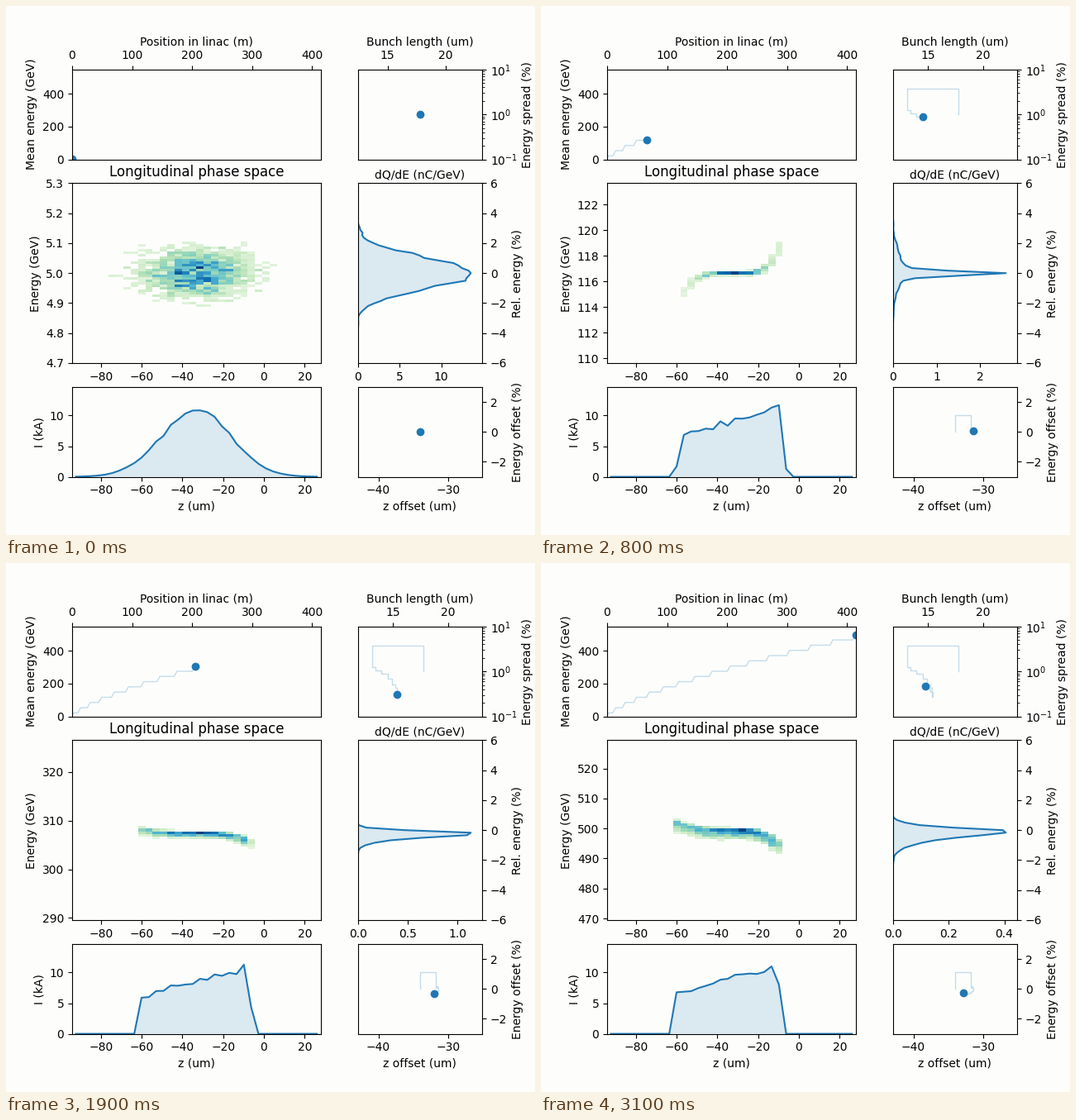
A matplotlib script that plays this animation: 640 px wide and 640 px high, repeating every 3200 ms.

```python
import numpy as np
import matplotlib.pyplot as plt
from matplotlib.animation import FuncAnimation

FRAMES, INTERVAL = 32, 100
BLUE, PAPER = "#1f77b4", "#fdfefc"
NZ, NE = 34, 71
Z_LO, Z_HI = -94.15, 27.85
TOTAL_KA = 130            # sum of the current over all z bins
CHARGE = 1.555            # nC
COUNTS_PER_KA = 32

cols = np.arange(NZ)
z_mid = Z_LO + (cols + 0.5) * (Z_HI - Z_LO) / NZ
bin_e = 12 / NE           # percent
rel = (np.arange(NE) - NE // 2) * bin_e

# The bunch alternates between a cell that changes its energy (odd frames)
# and a drift that changes its shape along z (even frames).
frames = np.arange(FRAMES)
cell = (frames + 1) // 2
drift = frames // 2

energy = np.where(cell == 0, 5.0, 20.95 + 31.9 * (cell - 1))
stride = np.where(frames % 2, 4.8, 1.53 * np.sqrt(energy))
stride[:2] = 0, 2.4
position = np.cumsum(stride)

length = np.interp(drift, [0, 1, 2, 4, 6, 8, 10, 15],
                   [17.78, 13.13, 13.4, 14.55, 15.25, 15.42, 15.37, 14.78])
z_off = np.interp(drift, [0, 1, 4, 6, 9, 13, 15],
                  [-34.05, -31.75, -31.4, -31.5, -32, -32.6, -32.85])
spread = np.interp(cell, [0, 1, 2, 3, 4, 6, 9, 13, 16],
                   [1, 3.7, 1.25, 1.05, 0.87, 0.51, 0.275, 0.415, 0.46])
e_off = np.interp(cell, [0, 1, 2, 3, 4, 6, 10, 13, 16],
                  [0, 1.13, 0.08, 0.2, 0.08, -0.08, -0.3, -0.3, -0.25])


def current(j):
    """A bell before compression, afterwards a ramp with fading horns."""
    if j == 0:
        amps = np.exp(-0.5 * ((z_mid + 33.5) / 17) ** 2)
    else:
        tail = np.interp(j, [1, 4, 6], [10.5, 9.25, 8.5])
        head = np.interp(j, [1, 4, 6, 9, 15], [21.8, 23.6, 23.9, 23.9, 23.2])
        u = np.clip((cols - tail) / (head - tail), 0, 1)
        horns = 8 * np.exp(-u / 0.08) + 14 * np.exp((u - 1) / 0.07)
        cover = np.clip(cols + 0.5 - tail, 0, 1) * np.clip(head - cols + 0.5, 0, 1)
        amps = cover * (6 + 5 * u + horns * 3.0 ** (1 - j))
    amps *= np.random.default_rng(j).normal(1, 0.03, NZ)
    return amps * TOTAL_KA / amps.sum()


def chirp(n):
    """Mean energy per column and its spread up and down, in percent."""
    k = cell[n]
    if k == 0:
        return np.zeros(NZ), 1, 1
    if k == 1:
        x = z_mid + 34
        if drift[n] == 0:
            return 1.1 + 0.11 * x - 2.4e-4 * x ** 3, 0.24, 0.24
        width = 0.2 + 0.07 * np.abs(x)
        return 1.1 + 0.09 * x, width, width
    x = (cols - 16.5) / 6.5
    lift = np.interp(k, [4, 6, 10, 13, 16], [1.6, 0.75, -0.4, -0.86, -0.92])
    power = np.interp(k, [4, 6, 10], [4.3, 2.5, 3])
    side = np.where(x > 0, 1, 0.87 if lift > 0 else 0.33)
    base = np.interp(k, [2, 4, 6, 10, 13, 16], [0.03, -0.02, -0.17, -0.17, -0.03, 0.02])
    centre = base + lift * side * np.sign(x) * np.abs(x) ** power
    extra = 0.35 * np.abs(np.gradient(centre))
    down = np.interp(k, [2, 6, 10, 13, 16], [0.07, 0.08, 0.2, 0.25, 0.33])
    return centre, 0.07 + extra, down + extra


def phase_space(n, amps):
    centre, up, down = chirp(n)
    d = rel[:, None] - centre
    shape = np.exp(-0.5 * (d / np.where(d > 0, up, down)) ** 2)
    area = 1.25 * (up + down) / bin_e
    shape /= np.maximum(shape.sum(axis=0), 0.5 * area)
    return np.random.default_rng(n + 3).poisson(shape * amps * COUNTS_PER_KA)


def spectrum(n, counts):
    density = np.convolve(counts.sum(axis=1), [0.2, 0.6, 0.2], "same")
    share = np.interp(cell[n], [0, 1, 2, 10, 13, 16], [.0736, .05, .31, .38, .235, .22])
    peak = share * CHARGE / (bin_e / 100 * energy[n])
    return peak * density / density.max()


fig, axes = plt.subplots(
    3, 2, figsize=(6.4, 6.4), dpi=100, facecolor=PAPER,
    gridspec_kw=dict(width_ratios=[2, 1], height_ratios=[1, 2, 1],
                     left=.125, right=.9, bottom=.11, top=.88, wspace=.2, hspace=.2))
(ax_e, ax_s), (ax_ps, ax_q), (ax_i, ax_o) = axes
for ax in axes.flat:
    ax.set_facecolor(PAPER)
for ax in (ax_e, ax_s):
    ax.xaxis.tick_top()
for ax in (ax_e, ax_s, ax_q):
    ax.xaxis.set_label_position("top")
for ax in (ax_s, ax_q, ax_o):
    ax.yaxis.tick_right()
    ax.yaxis.set_label_position("right")

ax_e.set(xlabel="Position in linac (m)", ylabel="Mean energy (GeV)",
         xlim=(0, position[-1]), ylim=(0, 550))
ax_s.set(xlabel="Bunch length (um)", ylabel="Energy spread (%)",
         yscale="log", ylim=(0.1, 10))
ax_ps.set(title="Longitudinal phase space", ylabel="Energy (GeV)", xlim=(Z_LO, Z_HI))
ax_q.set(xlabel="dQ/dE (nC/GeV)", ylabel="Rel. energy (%)", ylim=(-6, 6))
ax_i.set(xlabel="z (um)", ylabel="I (kA)", xlim=(Z_LO, Z_HI), ylim=(0, 14.66))
ax_o.set(xlabel="z offset (um)", ylabel="Energy offset (%)",
         xlim=(z_off[0] - length[0] / 2, z_off[0] + length[0] / 2), ylim=(-3, 3))


def tracker(ax, x, y):
    trail, = ax.plot([], [], color=BLUE, alpha=0.25, lw=1)
    dot, = ax.plot([], [], "o", color=BLUE)
    return trail, dot, x, y


def curve(ax):
    line, = ax.plot([], [], color=BLUE)
    area, = ax.fill([0, 0, 0], [0, 0, 0], color=BLUE, alpha=0.15, lw=0)
    return line, area


trackers = [tracker(ax_e, position, energy), tracker(ax_s, length, spread),
            tracker(ax_o, z_off, e_off)]
q_line, q_area = curve(ax_q)
i_line, i_area = curve(ax_i)
image = ax_ps.imshow(np.zeros((NE, NZ)), cmap="GnBu", origin="lower", aspect="auto",
                     interpolation="nearest", extent=(Z_LO, Z_HI, 4.7, 5.3))


def update(n):
    for trail, dot, x, y in trackers:
        trail.set_data(x[:n + 1], y[:n + 1])
        dot.set_data([x[n]], [y[n]])
    ax_s.set_xlim(min(0.7 * length[0], 0.9 * length[:n + 1].min()), 1.3 * length[0])

    amps = current(drift[n])
    i_line.set_data(z_mid, amps)
    i_area.set_xy(np.c_[np.r_[z_mid[0], z_mid, z_mid[-1]], np.r_[0, amps, 0]])

    counts = phase_space(n, amps)
    low, high = 0.94 * energy[n], 1.06 * energy[n]
    image.set_data(np.ma.masked_less(counts, 0.1 * counts.max()))
    image.set_clim(0, counts.max())
    image.set_extent((Z_LO, Z_HI, low, high))
    ax_ps.set_ylim(low, high)

    charge = spectrum(n, counts)
    q_line.set_data(charge, rel)
    q_area.set_xy(np.c_[np.r_[0, charge, 0], np.r_[rel[0], rel, rel[-1]]])
    ax_q.set_xlim(0, 1.1 * charge.max())
    return []


anim = FuncAnimation(fig, update, frames=FRAMES, interval=INTERVAL,
                     init_func=lambda: [], repeat=True, repeat_delay=0, blit=False)
plt.show()
```
